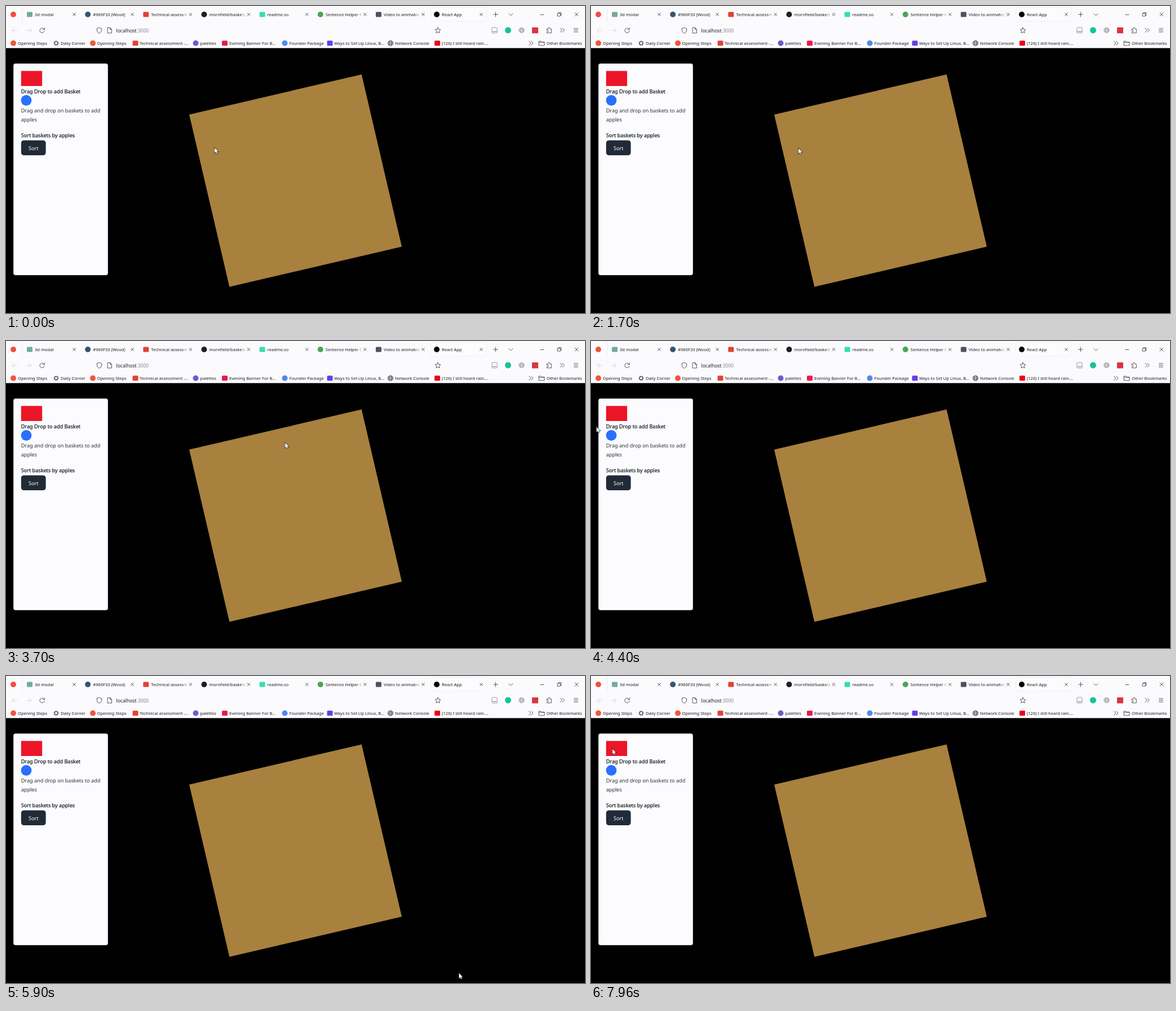
These frames come from a looping animation (1027 px wide and 545 px high, 8 s). An HTML page:

```html
<!DOCTYPE html>
<html lang="en">
<head>
<meta charset="utf-8">
<title>Baskets and apples</title>
<style>
  html, body { margin: 0; width: 100%; height: 100%; overflow: hidden; background: #000; }
  svg { display: block; }
  text { font: 7.55px "Noto Sans", "Open Sans", sans-serif; fill: #1b1b22; white-space: pre; }
  .line { fill: none; stroke: #45454d; stroke-width: .9; stroke-linecap: round; stroke-linejoin: round; }
  .faint { stroke: #d3d3d8; }
  .url { font-size: 8.5px; }
  .panel text { font-size: 9.1px; fill: #2b2f36; }
  .panel .strong { fill: #1c2026; stroke: #1c2026; stroke-width: .25; }
  .panel .label { fill: #fff; text-anchor: middle; }

  #pointer { animation: roam 8s linear infinite; paint-order: stroke; }
  @keyframes roam {
    0%, 14.125% { transform: translate(369.5px, 251px); }
    21.25% { transform: translate(367.5px, 252px); }
    30.375% { transform: translate(367.5px, 252px); animation-timing-function: ease-in; }
    32% { transform: translate(620px, 160px); animation-timing-function: ease-out; }
    33.1% { transform: translate(834px, 111px); }
    33.75% { transform: translate(840px, 121px); }
    36.25% { transform: translate(840px, 121px); animation-timing-function: ease-in-out; }
    46.25% { transform: translate(494.5px, 180px); }
    46.625% { transform: translate(494.5px, 180px); animation-timing-function: ease-in; }
    49.125% { transform: translate(230px, 211px); animation-timing-function: ease-out; }
    51.25% { transform: translate(0, 160px); }
    54.125% { transform: translate(0, 158px); animation-timing-function: ease-out; }
    60.75% { transform: translate(44.5px, 129px); }
    63.75% { transform: translate(44.5px, 129px); }
    65% { transform: translate(35.5px, 134px); animation-timing-function: ease-in-out; }
    73.75% { transform: translate(803px, 527px); }
    76.25% { transform: translate(803px, 527px); animation-timing-function: ease-in; }
    80.625% { transform: translate(680px, 534px); animation-timing-function: ease-out; }
    86.25% { transform: translate(465px, 472px); }
    86.625% { transform: translate(465px, 472px); animation-timing-function: ease-out; }
    89.5% { transform: translate(26.5px, 162px); animation-timing-function: ease-out; }
    96.625% { transform: translate(32px, 140px); }
    97% { transform: translate(32px, 140px); animation-timing-function: ease-out; }
    99.5%, 100% { transform: translate(37.5px, 129px); }
  }
</style>
</head>
<body>
<svg width="1027" height="545" viewBox="0 0 1027 545">
  <defs>
    <path id="cross" class="line" d="M-2.3-2.3 2.3 2.3M2.3-2.3-2.3 2.3"/>
    <path id="more" class="line" d="M-3.5-3.5 0 0-3.5 3.5M.5-3.5 4 0 .5 3.5"/>
    <g id="globe" class="line">
      <circle r="4.6"/><ellipse rx="2.1" ry="4.6"/><path d="M-4.6 0H4.6M-4-2.3H4M-4 2.3H4"/>
    </g>
  </defs>

  <!-- browser -->
  <rect width="1027" height="75" fill="#fbfbfe"/>
  <rect y="74" width="1027" height="1" fill="#b4b4b8"/>
  <path d="M28.5 0V28" stroke="#ececf1"/>
  <rect x="753.5" y="2.5" width="98.5" height="24.5" rx="3" fill="#fcfcfe" stroke="#f0f0f4"/>
  <circle cx="13" cy="15" r="5" fill="#f0503c"/>
  <g id="tabs"></g>
  <g class="line">
    <path d="M864.5 15H872.5M868.5 11V19"/>
    <path d="M892 13.5 895.5 17 899 13.5"/>
    <path d="M948 15.5H954"/>
    <path d="M978.5 13.2H983.3V18H978.5ZM980 13V11.7H984.8V16.5H983.5"/>
    <path d="M1009 12 1015 18M1015 12 1009 18"/>
  </g>

  <g class="line">
    <path class="faint" d="M19.5 43.5H11.5M15 39.5 11 43.5 15 47.5M36.5 43.5H44.5M41 39.5 45 43.5 41 47.5"/>
    <path d="M67.6 41A4.2 4.2 0 1 0 68.2 44.5M68.4 38.8V41.8H65.4"/>
    <path d="M165.5 38.5 169.7 40V43Q169.5 47 165.5 48.5 161.5 47 161.3 43V40Z"/>
    <path d="M180.5 38.5H184.5L187.5 41.5V48H180.5ZM184.5 38.5V41.5H187.5"/>
    <path d="M766 38.3 767.5 41.5 771 41.9 768.4 44.3 769.1 47.8 766 46.1 762.9 47.8 763.6 44.3 761 41.9 764.5 41.5Z"/>
    <path d="M959.5 40.8H962V39.5A1.4 1.4 0 0 1 964.8 39.5V40.8H967.3V47.8H959.5V45.5H960.7A1.3 1.3 0 0 0 960.7 42.9H959.5Z"/>
    <path d="M1007.5 40H1014.5M1007.5 43H1014.5M1007.5 46H1014.5"/>
  </g>
  <text class="url" x="195.5" y="46.7">localhost<tspan fill="#85858d">:3000</tspan></text>
  <rect x="861.8" y="38" width="9.5" height="10" rx="1.5" fill="#f5f5fa" stroke="#85879b" stroke-width=".8"/>
  <path d="M862.5 45.5H870.7" stroke="#85879b"/>
  <circle cx="890.5" cy="43" r="5.5" fill="#15c39a"/>
  <g opacity=".55"><use href="#globe" x="914.5" y="43"/></g>
  <rect x="933" y="38" width="11" height="10.5" fill="#d9363e"/>
  <use href="#more" x="986.5" y="43"/>

  <g id="marks"></g>
  <g class="line">
    <circle cx="89" cy="66" r="2.9" stroke-width="1.3"/>
    <circle cx="89" cy="66" r="4" stroke-width="1.3" stroke-dasharray="1 2.14" stroke-linecap="butt"/>
    <path d="M945.5 62.5H949L950.3 64H955V70H945.5ZM945.5 64.8H955"/>
  </g>
  <use href="#globe" x="682" y="66"/>
  <use href="#more" x="931" y="66"/>

  <!-- page -->
  <path d="M325 192.8 630.7 121.5 702 427.2 396.3 498.5Z" fill="#a8813e"/>
  <g class="panel">
    <rect x="13.5" y="102.5" width="167" height="375" rx="3" fill="#fcfcff" stroke="#c8cad0"/>
    <rect x="26.8" y="115.3" width="37.3" height="26.7" fill="#ed1528"/>
    <text class="strong" x="26.7" y="154.6">Drag Drop to add Basket</text>
    <circle cx="36" cy="167.5" r="9.4" fill="#2970ff"/>
    <text x="26.7" y="189.2">Drag and drop on baskets to add</text>
    <text x="26.7" y="205.2">apples</text>
    <text class="strong" x="26.7" y="232.7">Sort baskets by apples</text>
    <rect x="26.8" y="238.4" width="43.8" height="26.7" rx="5" fill="#212b38"/>
    <text class="label" x="48.7" y="255.5">Sort</text>
  </g>

  <path id="pointer" d="M.5.5V9.8L2.6 7.9 4 11 5.5 10.3 4.1 7.3H7Z" fill="#fff" stroke="#111" stroke-width="1.2"/>
</svg>
<script>
  const NS = "http://www.w3.org/2000/svg";
  const add = (parent, tag, attrs, label) => {
    const node = document.createElementNS(NS, tag);
    for (const key in attrs) node.setAttribute(key, attrs[key]);
    if (label) node.textContent = label;
    return parent.appendChild(node);
  };
  const icon = (parent, round, x, y, fill) => round
    ? add(parent, "circle", { cx: x, cy: y, r: 5, fill })
    : add(parent, "rect", { x: x - 5, y: y - 4.5, width: 10, height: 9, rx: 1.5, fill });

  // title, icon colour, round icon
  const tabs = [
    ["3d modal", "#74aa9c", 0],
    ["#966F33 (Wood)", "#36546f", 1],
    ["Technical assessment", "#e34133", 0],
    ["mornfield/baskets-app", "#1b1f23", 1],
    ["readme.so", "#35dfad", 0],
    ["Sentence Helper Online", "#4aa653", 1],
    ["Video to animated", "#4b5260", 0],
    ["React App", "#000", 1]
  ];
  const tabRow = document.getElementById("tabs");
  tabs.forEach(([title, fill, round], i) => {
    const x = 42 + i * 103.15;
    icon(tabRow, round, x, 15, fill);
    const clip = add(tabRow, "svg", { x: x + 8, y: 5, width: 64, height: 20 });
    add(clip, "text", { x: 1, y: 12.8 }, title);
    add(clip, "rect", { x: 58, width: 6, height: 20, fill: "#fbfbfe", opacity: .55 });
    add(tabRow, "use", { href: "#cross", x: x + 79, y: 15 });
  });

  // text x, title, icon x, icon colour, round icon
  const marks = [
    [21, "Opening Steps", 13, "#f2553d", 1],
    [97, "Daily Corner"],
    [161.5, "Opening Steps", 154, "#f2553d", 1],
    [237, "Technical assessment -...", 229.5, "#e34133", 0],
    [344.5, "palettes", 336.5, "#7359c9", 1],
    [396, "Evening Banner For B...", 388, "#ec1846", 0],
    [502.5, "Founder Package", 494.5, "#4c8bf0", 1],
    [582, "Ways to Set Up Linux, B...", 574.5, "#673de6", 0],
    [690, "Network Console"],
    [773, "(126) I still heard rain....", 765, "#f00018", 0],
    [959, "Other Bookmarks"]
  ];
  const markRow = document.getElementById("marks");
  for (const [x, title, at, fill, round] of marks) {
    if (at) icon(markRow, round, at, 66, fill);
    add(markRow, "text", { x, y: 68.8 }, title);
  }
</script>
</body>
</html>
```
